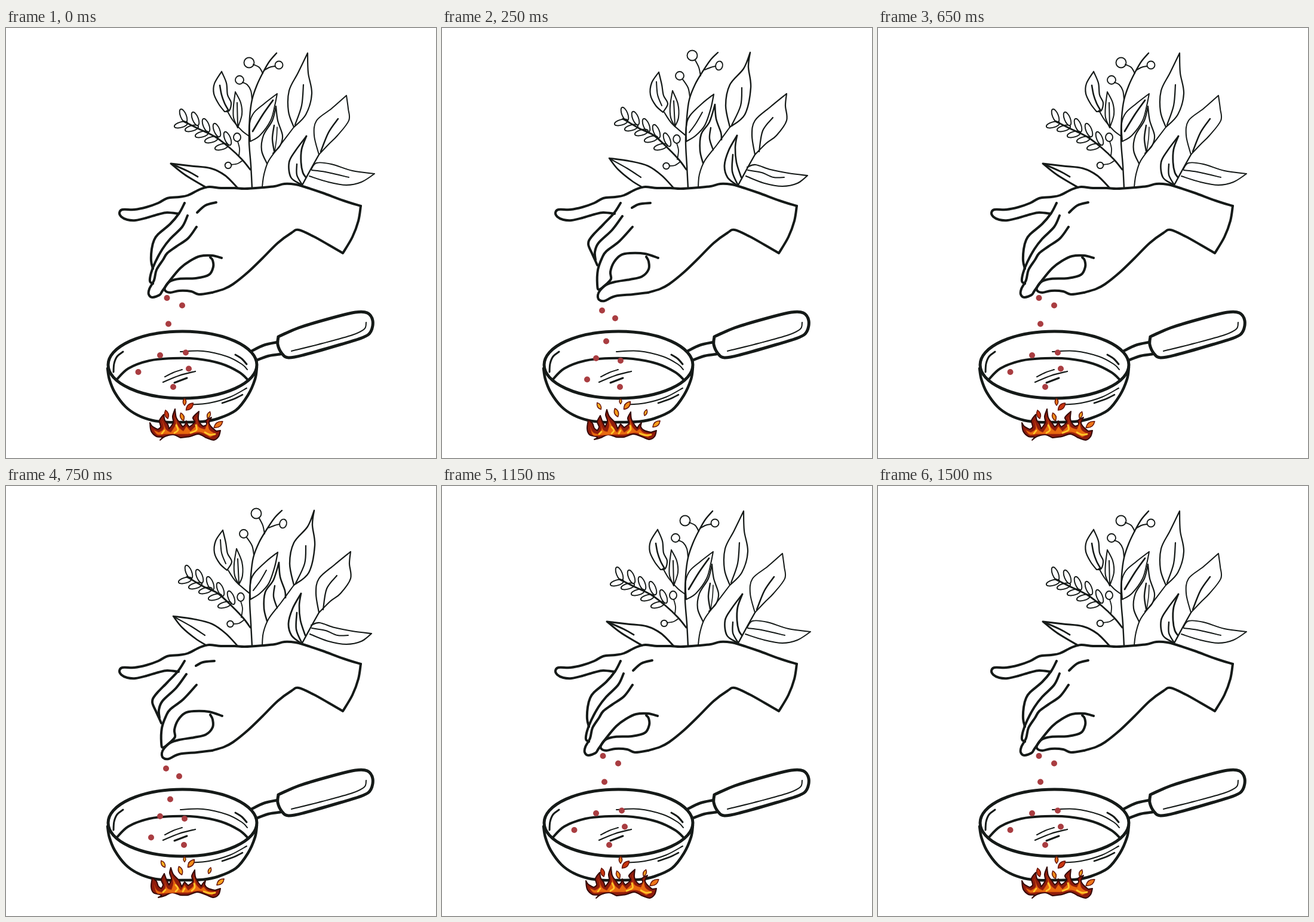
An HTML page that plays this animation: 720x720 px, repeating every 1750 ms.

```html
<!DOCTYPE html>
<html lang="en">
<head>
<meta charset="utf-8">
<title>Seasoning a pan</title>
<style>
html, body { margin: 0; width: 100%; height: 100%; overflow: hidden; background: #fff; }
svg { display: block; width: 100%; height: 100%; fill: none; stroke: #151a18; stroke-linecap: round; stroke-linejoin: round; }
</style>
</head>
<body>
<svg viewBox="0 0 720 720"><g id="still"></g><g id="lifted"></g><g id="pinched"></g></svg>
<script>
const [still, lifted, pinched] = ['still', 'lifted', 'pinched'].map(id => document.getElementById(id));

function add(parent, tag, attrs) {
  const node = document.createElementNS('http://www.w3.org/2000/svg', tag);
  for (const key in attrs) node.setAttribute(key, attrs[key]);
  parent.append(node);
}

// Smooth curve through the points; "/" marks a sharp corner.
function curve(text) {
  let last = null, d = '';
  for (const part of text.split('/')) {
    const p = part.trim().split(/\s+/).map(s => s.split(',').map(Number));
    if (last) p.unshift(last);
    else d = 'M' + p[0];
    for (let i = 0; i < p.length - 1; i++) {
      const a = p[i], b = p[i + 1], before = p[i - 1] || a, after = p[i + 2] || b;
      const c1 = a.map((v, k) => v + (b[k] - before[k]) / 6);
      const c2 = b.map((v, k) => v - (after[k] - a[k]) / 6);
      d += `C${c1} ${c2} ${b}`;
    }
    last = p[p.length - 1];
  }
  return d;
}

const line = (parent, width, points, extra) =>
  add(parent, 'path', { d: curve(points), 'stroke-width': width, ...extra });

const oval = (parent, cx, cy, rx, ry = rx, turn = 0) =>
  add(parent, 'ellipse', { cx, cy, rx, ry, 'stroke-width': 1.9, transform: `rotate(${turn} ${cx} ${cy})` });

const dots = (parent, points) => points.split(' ').forEach(p => {
  const [cx, cy] = p.split(',');
  add(parent, 'circle', { cx, cy, r: 5, fill: '#a93d41', stroke: 'none' });
});

function fern(parent, stem, upper, lower) {
  line(parent, 2.8, stem);
  upper.forEach(([x, y]) => oval(parent, x, y, 4.8, 12, -22));
  lower.forEach(([x, y]) => oval(parent, x, y, 11.5, 4.6, -16));
}

function spark(parent, x, y, length, turn, color) {
  const h = length / 2, w = length / 4.5;
  add(parent, 'path', {
    d: `M0 ${-h}Q${2 * w} 0 0 ${h}Q${-2 * w} 0 0 ${-h}Z`,
    fill: color, stroke: '#6a160b', 'stroke-width': 1.5,
    transform: `translate(${x} ${y}) rotate(${turn})`
  });
}

function fire(parent, outline, glow, cores) {
  line(parent, 2, outline, { fill: '#8f1c0c', stroke: '#330806' });
  line(parent, .8, glow, { fill: '#e8690f', stroke: '#b6330c' });
  cores.forEach(c => line(parent, 2.8, c, { stroke: '#ffc72b' }));
}

// Hand
line(still, 4, '594,298 565,289 530,276 500,266 485,262 466,261 450,265 430,267 400,269 383,268 360,268 340,266 325,270 305,280 290,283 270,285 255,293 235,300 215,304 195,304 190,309 193,316 203,321 217,322 235,318 255,312 270,309 289,311');
line(still, 4, '594,298 590,323 580,350 564,377 / 540,363 515,349 490,338 478,343 455,360 430,385 405,409 380,429 365,437 345,443');

line(lifted, 4, '345,443 323,446 310,441 290,440 275,443 266,439 268,431 275,424 290,420 318,419 340,413 347,400 346,389 342,384');
line(lifted, 4, '361,385 345,381 325,382 308,390 292,402 275,422 262,440 257,447 245,451 239,446 240,437 248,422 252,405 263,388 270,377 285,366 305,352 319,333');
line(lifted, 4, '299,293 290,310 275,328 255,345 248,355 244,370 243,390 246,403');
line(lifted, 4, '304,314 295,333 275,353 262,370 250,392 243,410 241,424 246,428');
line(lifted, 4, '320,309 334,297 352,292');

line(pinched, 4, '345,443 320,446 290,449 272,457 263,455 261,447 265,439 275,430 290,425 315,421 335,416 346,404 346,391 342,383');
line(pinched, 4, '362,385 340,378 315,377 300,380 288,392 282,408 283,420 275,429 263,438 260,430 261,405 268,385 275,374 297,357 319,333');
line(pinched, 4, '299,293 288,310 270,329 250,350 245,362 251,377 256,388 260,397');
line(pinched, 4, '302,315 285,338 262,360 256,375 257,388');
line(pinched, 4, '318,301 330,295 349,293');

// Pan
add(still, 'ellipse', { cx: 295.5, cy: 564, rx: 124.5, ry: 56, 'stroke-width': 5 });
line(still, 4.5, '170,570 173,588 182,610 200,634 220,648 245,657 270,660 300,660 330,659 355,654 385,640 405,615 417,588 420,568');
line(still, 4, '185,589 205,570 240,557 280,553 320,554 360,562 390,576 405,589');
line(still, 3, '196,542 186,550 181,562 180,576');
line(still, 2, '292,542 330,541 370,550 395,563 404,572');
line(still, 3, '384,547 395,554 403,563');
line(still, 2, '266,584 280,577 295,572');
line(still, 2.3, '263,593 290,582 317,575');
line(still, 3, '282,594 303,586');
line(still, 2, '306,631 340,628 375,618 403,603');
line(still, 2.6, '362,628 382,621 396,614');
line(still, 4.5, '411,541 432,531 455,526');
line(still, 4.5, '420,556 440,549 460,546');
line(still, 5, '456,517 490,502 540,487 585,476 605,477 614,490 611,508 598,518 560,530 500,547 473,552 462,545 455,530 456,517');
line(still, 2, '478,541 530,528 580,514 600,504 603,493');

// Plants, hand lifted
line(lifted, 2.4, '412,268 410,230 407,190 408,150 412,120 420,96 430,75 441,56 453,42');
line(lifted, 2, '430,76 424,66 414,61');
line(lifted, 2, '432,71 441,66 450,64');
line(lifted, 2, '412,120 410,105 404,95 396,91');
line(lifted, 1.8, '388,190 391,202 390,214');
line(lifted, 1.8, '377,229 388,227 396,222');
oval(lifted, 407, 58, 8.5);
oval(lifted, 457, 62, 6.5);
oval(lifted, 391, 87, 7);
oval(lifted, 387, 183, 6, 7);
oval(lifted, 372, 230, 5.3);
fern(lifted, '409,237 395,220 375,201 350,182 325,170 297,156',
  [[297, 147], [317, 152], [335, 163], [353, 171], [371, 185]],
  [[293, 162], [311, 168], [328, 178], [344, 187], [361, 199]]);
line(lifted, 2.2, '361,73 349,93 348,110 356,127 366,140 / 374,138 377,125 371,112 369,92 361,73');
line(lifted, 2.6, '358,96 361,112 366,126 372,137');
line(lifted, 2, '370,138 380,155 395,172 407,181');
line(lifted, 2, '384,107 381,130 381,150 388,167 / 395,145 393,125 384,107');
line(lifted, 2, '387,125 388,165');
line(lifted, 2, '454,110 432,127 415,142 408,160 409,190 / 425,180 443,155 450,130 454,110');
line(lifted, 2.8, '447,121 430,145 413,173');
line(lifted, 2.2, '437,227 428,205 431,180 446,155 452,131 / 455,155 463,180 459,197 447,210');
line(lifted, 2.4, '449,163 446,185 449,206');
line(lifted, 1.6, '454,166 453,185 450,206');
line(lifted, 2, '429,266 432,245 440,222 460,195 482,166');
line(lifted, 2.2, '505,42 489,75 474,105 473,140 482,166 / 502,145 512,110 506,75 505,42');
line(lifted, 2.2, '498,95 495,130 484,162');
line(lifted, 2, '570,113 545,135 520,155 516,180 524,212 / 540,195 555,180 574,155 573,135 570,113');
line(lifted, 2.6, '556,152 540,175 527,207');
line(lifted, 2.4, '496,263 510,237 524,212');
line(lifted, 2.6, '503,181 485,205 474,225 477,250 494,262');
line(lifted, 2.8, '503,181 495,203 494,225 497,242 502,250');
line(lifted, 2.4, '487,228 487,246 495,261');
line(lifted, 1.9, '511,237 520,226 545,228 580,239 617,244 / 595,258 570,263 540,258 508,248');
line(lifted, 2, '512,238 535,241 574,250');
line(lifted, 3, '388,268 367,247 343,235 310,231 276,227 / 300,246 335,267');
line(lifted, 2.8, '278,228 305,240 321,249');

// Plants, fingers pinched
line(pinched, 2.4, '412,268 410,230 408,190 410,150 414,120 424,94 437,72 450,53 462,41');
line(pinched, 2, '433,80 430,66 424,54');
line(pinched, 2, '440,70 450,66 458,64');
line(pinched, 2, '415,115 412,100 403,86');
line(pinched, 1.8, '393,193 396,205 394,220');
line(pinched, 1.8, '381,231 390,230 399,224');
oval(pinched, 419, 46, 8.5);
oval(pinched, 464, 63, 5.8, 7.5, 15);
oval(pinched, 398, 80, 7);
oval(pinched, 393, 186, 5.8, 7);
oval(pinched, 375.5, 231, 5.3);
fern(pinched, '409,237 398,222 380,203 355,180 330,168 303,152',
  [[306, 144], [324, 151], [342, 163], [359, 173], [377, 187]],
  [[300, 158], [317, 167], [334, 175], [350, 186], [366, 199]]);
line(pinched, 2.2, '363,74 351,92 349,112 358,130 370,141 / 378,127 371,113 368,95 363,74');
line(pinched, 2, '359,90 361,112 368,130');
line(pinched, 2, '372,141 385,160 408,180');
line(pinched, 2, '386,105 382,130 383,150 390,165 / 396,150 395,127 386,105');
line(pinched, 2, '388,122 390,163');
line(pinched, 2.2, '455,111 436,126 415,147 409,165 409,190 / 425,180 440,163 450,135 455,111');
line(pinched, 2, '436,141 425,160 414,175');
line(pinched, 2.6, '437,226 432,205 434,178 448,157 457,128 / 459,152 467,175 468,187');
line(pinched, 2.4, '450,167 448,185 454,204');
line(pinched, 2, '429,266 431,245 440,222 460,196 482,166');
line(pinched, 2.4, '516,41 505,68 482,95 475,130 482,166 / 507,145 517,100 513,65 516,41');
line(pinched, 2.2, '502,100 500,130 485,163');
line(pinched, 2.2, '577,110 550,132 524,155 519,180 524,212 / 543,193 560,180 577,155 575,130 577,110');
line(pinched, 2.2, '554,150 537,172 531,207');
line(pinched, 2.4, '496,263 510,237 524,212');
line(pinched, 2.8, '494,180 480,205 473,230 478,250 492,262');
line(pinched, 2.6, '494,180 491,200 493,225 501,250');
line(pinched, 2.6, '487,212 486,240 495,262');
line(pinched, 2.2, '511,233 525,229 550,237 580,243 612,247 / 595,260 570,265 540,260 509,248');
line(pinched, 2, '512,238 535,242 555,250 573,250');
line(pinched, 2.6, '388,268 368,247 345,231 315,223 280,218 / 295,237 318,256 336,267');
line(pinched, 2.2, '283,220 310,235 333,250');

// Seasoning
dots(lifted, '269.5,452 295,464.5 272,495.5 258,548 301,543.5 221.5,576 306,570.5 280,601');
dots(pinched, '268,473 290,486 275,524.5 258,553 299,557 243,588.5 298,601');

// Fire
fire(lifted,
  '241,661 245,667 254,672 / 259,668 257,657 264,647 / 266,657 271,664 273,671 / 280,661 279,650 283,638 / 285,652 291,661 296,668 / 300,664 302,658 / 304,664 307,668 / 316,660 313,652 323,642 / 322,654 325,662 330,667 / 336,664 335,657 344,652 / 340,661 344,668 352,675 / 359,674 / 356,684 348,690 335,686 / 322,680 308,684 292,686 / 280,681 266,684 258,690 / 262,685 252,684 243,675 241,661',
  '247,673 256,677 / 264,671 262,658 / 268,672 276,677 / 284,664 283,652 / 289,668 297,675 / 302,667 / 309,675 / 319,664 319,652 / 322,667 333,672 / 338,661 / 341,673 352,680 / 342,685 / 325,677 305,680 / 285,680 266,680 / 254,681 247,673',
  ['261,679 265,674', '282,678 288,673 285,665', '309,678 319,673 318,665', '333,677 342,681 350,680']);
[[299, 626, 12, 0, '#ee7518'], [307.5, 634, 17, 45, '#c9350f'], [269, 647, 15, -15, '#c9350f'],
 [295, 651, 14, -20, '#f28b18'], [339.5, 648, 12, 20, '#f5a020'], [355.5, 664, 18, 55, '#ee7518']]
  .forEach(s => spark(lifted, ...s));

fire(pinched,
  '245,656 252,662 255,670 260,674 / 263,668 260,659 265,649 / 269,660 273,668 / 277,658 274,648 276,639 / 280,650 290,661 294,671 / 299,663 / 305,669 / 313,662 311,653 316,643 / 317,654 322,664 327,670 / 330,665 334,661 / 333,668 339,674 350,677 / 359,674 / 356,684 347,689 334,684 / 320,680 305,685 292,685 / 278,681 266,686 255,689 / 260,685 247,681 243,671 245,656',
  '248,668 253,677 261,680 / 267,672 265,660 / 270,673 277,676 / 280,665 278,654 / 286,668 293,677 / 299,668 / 305,677 / 314,669 315,655 / 319,668 326,675 / 331,671 / 338,678 352,680 / 345,685 / 325,678 305,681 / 288,681 266,682 / 253,682 248,668',
  ['263,680 267,676', '284,679 288,674 284,668', '296,679 299,674', '311,678 316,672 315,666', '331,679 341,682 350,681']);
[[299, 625, 9, 0, '#ffb727'], [310, 632, 17, 40, '#f28b18'], [263, 633, 13, -30, '#ffb020'],
 [292, 644, 15, -20, '#f9a01c'], [341, 644, 11, 20, '#ffb020'], [359, 663, 16, 50, '#f9a01c']]
  .forEach(s => spark(pinched, ...s));

function frame() {
  const step = Math.floor(performance.now() % 1750 / 250);
  lifted.style.display = step % 2 ? 'none' : '';
  pinched.style.display = step % 2 ? '' : 'none';
  requestAnimationFrame(frame);
}
frame();
</script>
</body>
</html>
```
